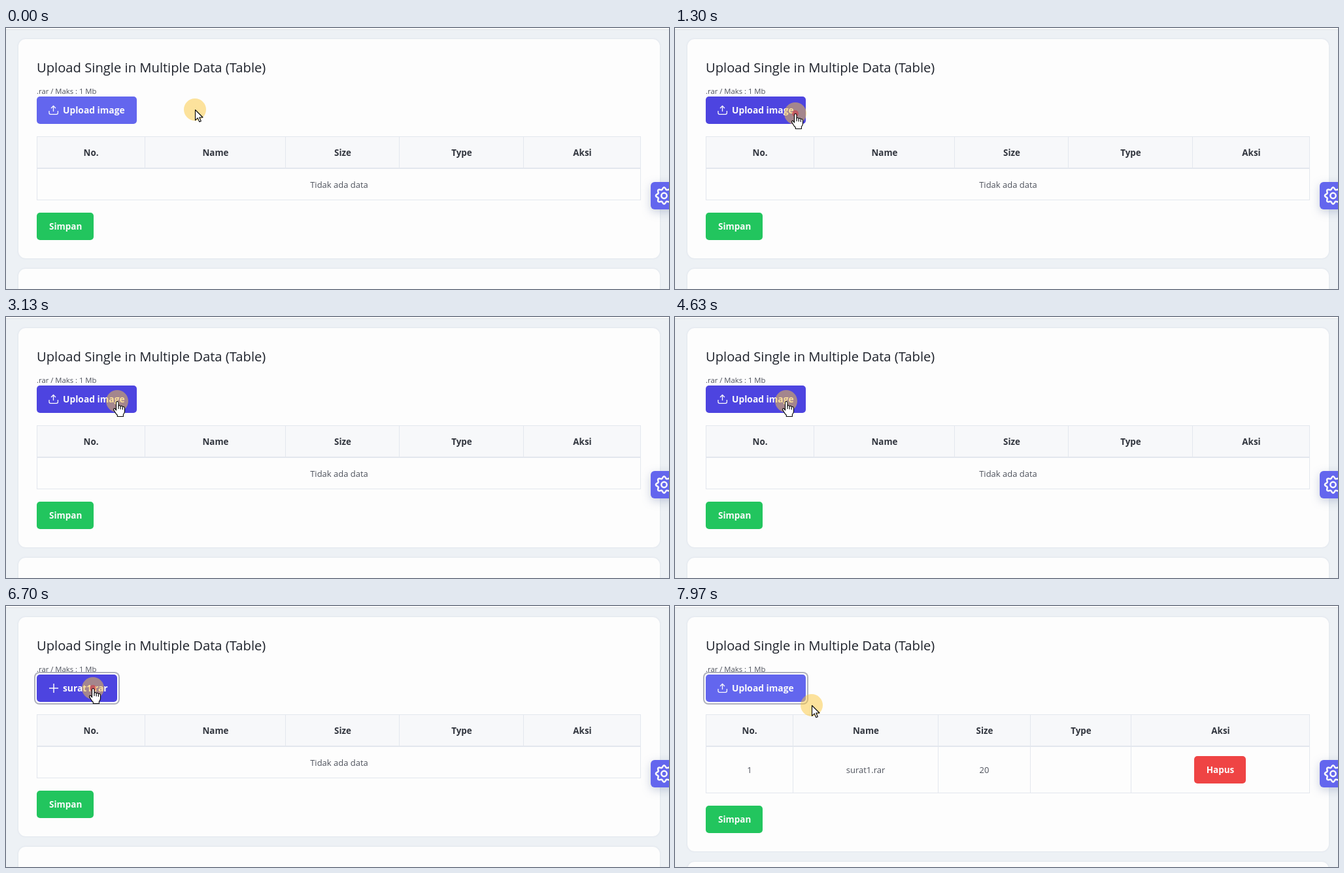
These frames come from a looping animation (1014x400 px, 8 s). An HTML page with a canvas:

```html
<!DOCTYPE html>
<html lang="id">
<head>
<meta charset="utf-8">
<title>Upload table</title>
<style>
html, body { margin: 0; width: 100%; height: 100%; overflow: hidden; background: #edf1f5; }
canvas { display: block; width: 1014px; height: 400px; }
</style>
</head>
<body>
<canvas id="stage" width="1014" height="400"></canvas>
<script>
const ctx = document.getElementById('stage').getContext('2d');
const LOOP = 8000;
const FILE_PICKED = 4720, ROW_ADDED = 6850;
const FONT = '"Open Sans", "Noto Sans", sans-serif';
const PAGE = '#edf1f5', CARD = '#fdfdfd', LINE = '#e3e7ee';
const DARK = '#1e222b', GRAY = '#4e525c', LIGHT = '#fbfbfb';

// time, x, y of the pointer
const PATH = [
  [0, 289, 125], [30, 289, 125], [950, 184, 131], [1700, 184, 131],
  [2130, 170, 129], [5570, 170, 129],
  [6170, 133, 126], [7400, 133, 126], [7970, 209, 152]
];
const HOVERS = [[610, FILE_PICKED], [5600, 7830]];
const CLICKS = [1210, 6610];

const clamp = v => Math.max(0, Math.min(1, v));
const ramp = (t, a, b) => clamp((t - a) / (b - a));
const ease = p => p * p * (3 - 2 * p);
const mix = (a, b, p) => a + (b - a) * p;

function pointerAt(t) {
  for (let i = 1; i < PATH.length; i++) {
    const [t0, x0, y0] = PATH[i - 1], [t1, x1, y1] = PATH[i];
    if (t <= t1) {
      const p = ease(ramp(t, t0, t1));
      return [mix(x0, x1, p), mix(y0, y1, p)];
    }
  }
  return PATH[PATH.length - 1].slice(1);
}

function box(x, y, w, h, r, fill) {
  ctx.beginPath();
  ctx.roundRect(x, y, w, h, r);
  ctx.fillStyle = fill;
  ctx.fill();
}

function text(str, x, y, size, color, weight = 400, align = 'left') {
  ctx.font = `${weight} ${size}px ${FONT}`;
  ctx.fillStyle = color;
  ctx.textAlign = align;
  ctx.fillText(str, x, y);
}

function stroke(points, color, width) {
  ctx.beginPath();
  points.forEach(([x, y], i) => i ? ctx.lineTo(x, y) : ctx.moveTo(x, y));
  ctx.strokeStyle = color;
  ctx.lineWidth = width;
  ctx.stroke();
}

function card(y, h) {
  ctx.save();
  ctx.shadowColor = 'rgba(130,145,180,.2)';
  ctx.shadowBlur = 3;
  box(19, y, 981, h, 11, CARD);
  ctx.restore();
}

function table(cols, bottom, split) {
  ctx.fillStyle = '#f7f8fa';
  ctx.fillRect(47, 166, 924, 49);
  ctx.strokeStyle = LINE;
  ctx.lineWidth = 1;
  ctx.strokeRect(47.5, 166.5, 923, bottom - 166);
  stroke([[47, 215], [971, 215]], LINE, 2);
  cols.slice(1, -1).forEach(x =>
    stroke([[x - .5, 166], [x - .5, split ? bottom : 215]], LINE, 1));
  ['No.', 'Name', 'Size', 'Type', 'Aksi'].forEach((label, i) =>
    text(label, (cols[i] + cols[i + 1]) / 2, 196, 13.4, '#31353e', 700, 'center'));
}

function uploadIcon() {
  stroke([[72.5, 128], [72.5, 119.5]], LIGHT, 1.3);
  stroke([[69, 123], [72.5, 119.5], [76, 123]], LIGHT, 1.3);
  ctx.beginPath();
  ctx.moveTo(66, 127);
  ctx.lineTo(66, 130);
  ctx.quadraticCurveTo(66, 132.4, 68.4, 132.4);
  ctx.lineTo(77, 132.4);
  ctx.quadraticCurveTo(79.4, 132.4, 79.4, 130);
  ctx.lineTo(79.4, 127);
  ctx.stroke();
}

function plusIcon() {
  stroke([[66, 126], [80, 126]], LIGHT, 1.5);
  stroke([[73, 119], [73, 133]], LIGHT, 1.5);
}

function uploadButton(t, hover) {
  const picked = t >= FILE_PICKED && t < ROW_ADDED;
  const w = picked ? 123 : 153;
  if (t >= FILE_PICKED) {
    box(43, 101, w + 8, 50, 8, '#b0b2bd');
    box(45, 103, w + 4, 46, 6, '#fff');
  }
  const idle = [99, 102, 238], active = [77, 68, 224];
  const fill = idle.map((c, i) => Math.round(mix(c, active[i], hover)));
  box(47, 105, w, 42, 5, `rgb(${fill})`);
  picked ? plusIcon() : uploadIcon();
  text(picked ? 'surat1.rar' : 'Upload image', 87, 131, 13.8, LIGHT, 700);
}

function gear() {
  ctx.save();
  ctx.shadowColor = 'rgba(110,125,165,.35)';
  ctx.shadowBlur = 14;
  ctx.shadowOffsetY = 4;
  box(986, 236, 40, 42, 6, '#6366ee');
  ctx.restore();
  const points = [];
  for (let i = 0; i <= 96; i++) {
    const a = i / 96 * Math.PI * 2, r = 11.1 + 1.5 * Math.cos(8 * a);
    points.push([1006.5 + r * Math.cos(a), 257 + r * Math.sin(a)]);
  }
  stroke(points, LIGHT, 2.5);
  ctx.beginPath();
  ctx.arc(1006.5, 257, 4.2, 0, Math.PI * 2);
  ctx.stroke();
}

const ARROW = new Path2D('M.5 .5V16.4L4.2 12.9L6.8 18.8L9.3 17.7L6.8 12H12Z');
const HAND = new Path2D('M-1.5 14V2Q-1.5 .5 .2 .5Q2 .5 2 2V8Q2 6.5 3.6 6.5Q5.2 6.5 5.2 8.5Q5.4 7.2 6.9 7.2Q8.4 7.4 8.4 9.2Q8.6 8.3 9.9 8.5Q11.5 8.8 11.5 10.5V15.5Q11.5 18 9.4 20.3V23.5H.3V21.3Q-2 19.5-3.3 16.8L-5.3 13.4Q-5.9 11.8-4.7 11.2Q-3.5 10.8-2.5 12.4Z');
const KNUCKLES = new Path2D('M2 8V12M5.2 8.5V12.5M8.4 9.2V13');

function pointer(t, hover) {
  const [x, y] = pointerAt(t);
  ctx.save();
  ctx.translate(x, y);
  ctx.beginPath();
  ctx.arc(0, 0, 17, 0, Math.PI * 2);
  ctx.fillStyle = 'rgba(252,200,60,.5)';
  ctx.fill();
  for (const start of CLICKS) {
    const p = ramp(t, start, start + 180);
    if (p > 0 && p < 1) {
      ctx.beginPath();
      ctx.arc(0, 0, 3 + 4 * p, 0, Math.PI * 2);
      ctx.fillStyle = `rgba(225,35,45,${.9 * (1 - p)})`;
      ctx.fill();
    }
  }
  const shape = hover ? HAND : ARROW;
  ctx.fillStyle = '#fff';
  ctx.strokeStyle = '#000';
  ctx.lineWidth = 1.1;
  ctx.lineJoin = 'round';
  ctx.fill(shape);
  ctx.stroke(shape);
  if (hover) ctx.stroke(KNUCKLES);
  ctx.restore();
}

function draw(t) {
  const added = t >= ROW_ADDED, shift = added ? 23 : 0;
  const over = HOVERS.some(([a, b]) => t >= a && t < b);
  const hover = Math.max(...HOVERS.map(([a, b]) =>
    ramp(t, a, a + 150) * (1 - ramp(t, b, b + 120))));

  ctx.fillStyle = PAGE;
  ctx.fillRect(0, 0, 1014, 400);
  ctx.fillStyle = CARD;
  ctx.fillRect(0, 0, 1014, 2);
  ctx.fillStyle = '#dde1e6';
  ctx.fillRect(0, 2, 1014, 1);
  card(17, 336 + shift);
  card(369 + shift, 60);

  text('Upload Single in Multiple Data (Table)', 47, 68, 20.2, DARK);
  text('.rar / Maks : 1 Mb', 47, 101, 11.3, GRAY);
  uploadButton(t, hover);

  if (added) {
    table([47, 181, 403, 544, 698, 971], 286, true);
    [['1', 114], ['surat1.rar', 291.5], ['20', 473]].forEach(([s, x]) =>
      text(s, x, 256, 13, GRAY, 400, 'center'));
    box(794, 230, 79, 42, 5, '#ef4444');
    text('Hapus', 834, 256, 13.5, LIGHT, 700, 'center');
  } else {
    table([47, 213, 428, 602, 792, 971], 263, false);
    text('Tidak ada data', 509.5, 245, 13, GRAY, 400, 'center');
  }

  box(47, 283 + shift, 87, 42, 5, '#22c55e');
  text('Simpan', 66, 309 + shift, 13.5, LIGHT, 700);
  gear();
  pointer(t, over);
}

const begin = performance.now();
function tick() {
  draw((performance.now() - begin) % LOOP);
  requestAnimationFrame(tick);
}
tick();
</script>
</body>
</html>
```
